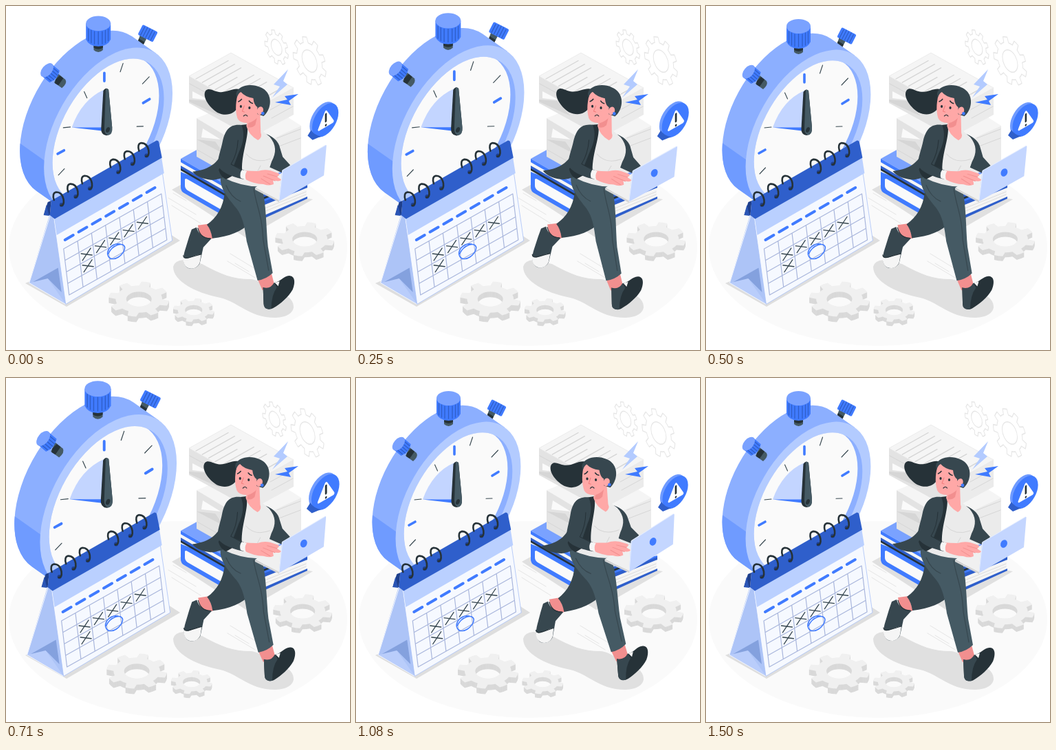
Animation of 500x500 px, one loop 1540 ms. Source, as an HTML page:

```html
<!DOCTYPE html>
<html lang="en">
<head>
<meta charset="utf-8">
<title>Deadline</title>
<style>
html, body { margin: 0; width: 100%; height: 100%; overflow: hidden; background: #fff; }
svg { display: block; width: 100vw; height: 100vh; }
.line { fill: none; stroke-linecap: round; stroke-linejoin: round; }
</style>
</head>
<body>
<svg viewBox="0 0 500 500">
  <ellipse cx="250" cy="351" rx="246" ry="143" fill="#fafafa"/>
  <path class="line" stroke="#e6e6e6" d="M236 279L276 303M243 272L262 283M241 290L283 316M326 360L372 388M333 374L353 386M322 371L362 395"/>

  <g id="clock">
    <!-- side buttons -->
    <path d="M195 42L205 47L198 60L190 56Z" fill="#455a64"/>
    <path d="M190 56L198 60L200 56L192 51Z" fill="#263238"/>
    <g transform="translate(204.500 43.500) rotate(27)">
      <rect x="-12" y="-8" width="24" height="16" rx="2" fill="#407bff"/>
      <path class="line" stroke="#2f5fc8" stroke-width="1.300" d="M-8 -6V7M-4 -7V7M0 -7V7M4 -7V7M8 -6V7"/>
    </g>
    <g transform="matrix(.866 -.5 0 1 148.500 181)">
      <path fill="#8cafff" d="M78 -70.300L38.700 -113.900A105 105 0 0 0 -117.300 26.700L-78 70.300Z"/>
      <path fill="#6f9bff" d="M-104.500 -10L-143.800 -53.600A105 105 0 0 0 -117.300 26.700L-78 70.300Z"/>
      <circle r="105" fill="#b3cbff"/>
      <circle r="91" fill="#8cafff"/>
      <clipPath id="hole"><circle r="91"/></clipPath>
      <g clip-path="url(#hole)"><circle cx="-8" cy="-8" r="91" fill="#fafafa"/></g>
    </g>
    <path class="line" stroke="#407bff" stroke-width="3.600" d="M143 99.500V111M198 142L207 136.500M77 214L86 209"/>
    <path class="line" stroke="#37474f" stroke-width="1.100" d="M169.500 86L165.500 98M206.500 105L197 115M198 175L189 175.300M114.500 126L118.500 135M85 177L95 176M86.500 235L78 244"/>
    <path d="M97 176.500Q111 137 143 123L146 180Z" fill="#c3d5ff"/>
    <path d="M97 176.500L140 176.500V181.500Z" fill="#407bff"/>
    <path d="M141.500 125Q145 119 149 123L154 176Q155 187 146 188Q138 187 138.500 178Z" fill="#263238"/>
    <path d="M145 122Q148 121 149 124L154 176Q155 187 148 187.500Q143 186 143 178Z" fill="#455a64"/>
    <ellipse cx="148" cy="180" rx="2.600" ry="4" transform="rotate(25 148 180)" fill="#263238"/>

    <!-- crown -->
    <path d="M128 56H141V67Q134.500 73 128 67Z" fill="#455a64"/>
    <path d="M128 60H141V64Q134.500 68 128 64Z" fill="#263238"/>
    <path d="M117 29.500V52Q121 61.500 134.500 62Q148 61.500 152 52V29.500Z" fill="#407bff"/>
    <path class="line" stroke="#2f5fc8" stroke-width="1.300" d="M120.500 37V54M124.500 39V57M129 41V58.500M134.500 41V59M140 41V58.500M144.500 39V57M148.500 37V54"/>
    <ellipse cx="134.500" cy="29.500" rx="17.500" ry="10.500" fill="#7aa2ff"/>

    <!-- left button -->
    <path d="M78 101L88 109Q91 114 83 121L72 113Z" fill="#455a64"/>
    <path d="M74 109L80 103L85 107L78 117L73 114Z" fill="#263238"/>
    <g transform="translate(66.500 99.500) rotate(-50)">
      <path d="M-11 -7V8Q0 14 11 8V-7Z" fill="#407bff"/>
      <path class="line" stroke="#2f5fc8" stroke-width="1.300" d="M-8 -2V8M-4 0V10M0 0V10M4 0V10M8 -2V8"/>
      <ellipse cy="-6" rx="11.500" ry="7" fill="#7aa2ff"/>
    </g>
  </g>

  <path d="M28 403L40 398L90 415L236 330L253 341L88 437Z" fill="#dedede"/>

  <g class="shake">
    <!-- calendar stand -->
    <path d="M64 302L34 402.500L87 433.500L70 300Z" fill="#adc4f7"/>
    <path d="M38 402L76 380.500L81 416L62 397Z" fill="#84a1de"/>
    <path d="M34 402.500L61 396L87 433Z" fill="#b9cdfb"/>
    <path class="line" stroke="#f2f6ff" d="M64 306L34 402.500L87 433.500"/>
    <path d="M66 286L221 197L242 341L87 433.500Z" fill="#f6f9ff" stroke="#a9c1f6" stroke-width=".8"/>
    <path d="M70 306L226 218L230 243L74 333Z" fill="#bad0ff"/>
    <path d="M66 283L219 195.500Q222 195 222.500 198L227 220.500L71 309.500L64 304Z" fill="#2f5fcb"/>
    <path d="M61 285L66 283L64 304L55 304Z" fill="#1e3f8c"/>
    <path d="M55 304L59 289L63 305Z" fill="#2a55b5"/>
    <g id="sheet"></g>
    <path class="line" stroke="#407bff" stroke-width="1.500" d="M166 346C153 344 145 357 149 364C156 374 173 361 173 351C171 342 155 347 149 360"/>
  </g>

  <g class="shake" id="gears"></g>

  <!-- books and paper -->
  <path d="M241 267L272 250L446 281L349 337Z" fill="#e0e0e0"/>
  <path d="M254 241L346 278L438 258V264L346 304Z" fill="#407bff"/>
  <path d="M254 241L346 294V322L259 272Q254 269 254 264Z" fill="#407bff"/>
  <path d="M260 252Q261 250 264 252L346 299V315L264 268Q260 265 260 261Z" fill="#fafafa"/>
  <path d="M346 299L437 264V278L346 317Z" fill="#f5f5f5"/>
  <path d="M346 295L438 260V264L346 301ZM346 317L438 277V280L346 322Z" fill="#2f5fcb"/>
  <path d="M346 306L436 270M346 311L436 274" class="line" stroke="#dcdcdc"/>
  <path d="M254 234L346 287L438 252V256L346 292L254 239Z" fill="#263238"/>
  <path d="M254 222L281 207L438 241L346 275Z" fill="#7aa2ff"/>
  <path d="M256 227L346 279L437 245V250L346 285L256 233Z" fill="#f5f5f5"/>
  <path d="M254 222L346 275L438 241V245L346 280L254 227Z" fill="#407bff"/>
  <path d="M254 232L346 285L438 250V253L346 289L254 236Z" fill="#2f5fcb"/>
  <path d="M277 163L353 207V262L277 219Z" fill="#e3e3e3"/>
  <path d="M353 207L429 174V226L353 264Z" fill="#ebebeb"/>
  <path d="M277 163L360 130L429 174L353 209Z" fill="#f5f5f5"/>
  <path d="M286 178L312 194L284 191Z" fill="#fafafa"/>
  <path d="M277 194L304 197L317 215L277 194Z" fill="#d6d6d6"/>
  <path class="line" stroke="#d6d6d6" d="M278 209L320 233M394 192L428 179M394 205L428 192"/>
  <path d="M266 102L357 153V191L266 141Z" fill="#e3e3e3"/>
  <path d="M357 153L418 119V158L357 191Z" fill="#ebebeb"/>
  <path d="M266 102L327 68L418 119L357 153Z" fill="#f5f5f5" stroke="#e3e3e3" stroke-width=".6"/>
  <path d="M271 124L296 137L271 134Z" fill="#fafafa"/>
  <path d="M266 136L292 138L312 160L266 139Z" fill="#d6d6d6"/>
  <path class="line" stroke="#d6d6d6" d="M267 113L300 131M384 151L417 133M386 163L417 146"/>
  <g id="print" class="line" stroke="#d6d6d6" stroke-width="1.400"></g>

  <path d="M410 92L389 114L398 117L387 133L409 114L403 109Z" fill="#b3cbff"/>
  <path d="M425 128L405 131L409 136L391 140L414 144L411 138Z" fill="#407bff"/>

  <path d="M243 379Q245 370 258 369L285 375C312 390 330 397 355 397C372 398 380 411 400 418Q418 424 418 438C416 453 390 457 365 449C337 438 331 428 307 423C278 417 243 401 243 379Z" fill="#e0e0e0"/>

  <g id="woman">
    <!-- trailing leg -->
    <path d="M279 319L294 317L301 338L284 343Z" fill="#f28f8f"/>
    <path d="M277 322Q281 337 299 338L287 351L282 374C278 383 266 384 262 379C256 372 258 362 262 350Q266 336 270 325Z" fill="#37474f"/>
    <path d="M258 365C264 371 272 362 284 361L282 373C278 384 266 384 261 378Q257 373 258 365Z" fill="#f5f5f5"/>
    <path class="line" stroke="#263238" stroke-width="1.200" d="M258 363C259 371 270 364 284 361M279 323Q283 338 297 338"/>
    <path d="M318 270C316 293 306 308 292 318Q298 325 300 338C325 335 343 328 356 314L350 272Z" fill="#37474f"/>

    <!-- leading leg -->
    <path d="M366 397L386 388L391 407L373 413Z" fill="#f28f8f"/>
    <path d="M374 409Q384 415 391 402C399 401 405 391 413 392C422 393 420 405 417 412C411 423 399 433 389 439C381 443 375 439 375 432Z" fill="#263238"/>
    <path d="M374 409Q385 412 390 402L394 409Q386 420 386 440Q375 442 375 433Z" fill="#37474f"/>
    <path d="M391 402L398 400L396 407Z" fill="#f5f5f5"/>
    <path d="M312 248C310 264 321 277 335 294C344 306 347 320 350 342L366 399Q379 397 388 388L381 350C378 322 379 288 371 259Z" fill="#455a64"/>
    <path class="line" stroke="#37474f" stroke-width="1.200" d="M360 265C364 292 372 301 374 340L382 384M320 261Q327 278 341 284"/>

    <!-- torso -->
    <path d="M378 186Q395 193 398 206L402 219L413 231L403 243L378 232Z" fill="#37474f"/>
    <path d="M331 176L349 172L372 181L383 190C393 202 393 213 386 226L374 262Q345 264 315 249Z" fill="#ebebeb"/>
    <path class="line" stroke="#d6d6d6" d="M349 215Q362 230 384 222M370 232L364 243"/>
    <path d="M315 212C305 232 292 238 271 241C277 249 290 253 302 253Q318 250 331 243Z" fill="#37474f"/>
    <path d="M341 173L350 172C354 189 342 213 343 239L320 252Q312 249 309 238Z" fill="#263238"/>
    <path d="M342 173C325 171 319 180 315 195C312 211 307 221 308 231C310 241 330 249 347 252L351 241L331 232L339 211Q349 190 342 173Z" fill="#37474f"/>
    <path class="line" stroke="#263238" d="M337 195Q336 215 327 230L346 240"/>

    <!-- laptop and hands -->
    <path d="M362 264L376 255L402 242L397 283Z" fill="#f0f0f0"/>
    <path d="M362 264L397 282V285L362 267Z" fill="#d6d6d6"/>
    <path d="M401 239L464 202Q466 201 465.500 204L462 246L398 283Q396 283 397 280Z" fill="#c4d6ff"/>
    <path class="line" stroke="#e6eeff" d="M464 202L402 238.500L397 282"/>
    <ellipse cx="433" cy="241" rx="4.700" ry="6" transform="rotate(25 433 241)" fill="#407bff"/>
    <path d="M345 239Q356 240 366 240Q375 237 384 239L396 243Q399 245 394 248L400 252Q398 256 388 253L389 259Q383 262 374 259Q361 259 346 251Z" fill="#ffa8a7"/>
    <path class="line" stroke="#f28f8f" d="M374 247L391 254M371 251L384 259M380 244L394 248"/>
    <path d="M343 238L350 240Q346 246 349 253L341 250Q339 243 343 238Z" fill="#f5f5f5"/>

    <!-- head -->
    <path d="M344 123C331 116 323 127 309 125C301 124 295 118 290 123C284 131 294 147 307 155C320 161 331 157 337 147Z" fill="#263238"/>
    <path d="M352 163L349 174Q352 187 366 195Q373 191 370 184L369 155Z" fill="#ffa8a7"/>
    <path d="M352 170Q360 168 365 160L362 173Q357 178 351 176Z" fill="#f28f8f"/>
    <path d="M337 125C334 138 332 150 336 163Q339 170 350 170Q364 168 370 154L371 133L350 120Z" fill="#ffa8a7"/>
    <path d="M334 127C337 115 356 112 369 118C382 123 386 136 382 148Q379 156 374 160L365 157L365 147Q360 144 359 134Q347 132 341 125Q337 127 335 134Z" fill="#37474f"/>
    <ellipse cx="369" cy="152" rx="4.500" ry="6" transform="rotate(20 369 152)" fill="#ffa8a7"/>
    <circle cx="373" cy="156" r="2.400" fill="#407bff"/>
    <ellipse cx="341" cy="146" rx="1.600" ry="2" fill="#263238"/>
    <ellipse cx="353.500" cy="148" rx="1.600" ry="2" fill="#263238"/>
    <path class="line" stroke="#263238" stroke-width="1.600" d="M337.500 139Q340 138 342 135.500M353 138Q355 141 358 141.500"/>
    <path class="line" stroke="#f27f7f" stroke-width="1.100" d="M346 145L343 153L346 154"/>
    <path class="line" stroke="#263238" stroke-width="1.200" d="M345 160Q348 156.500 350.500 160"/>
  </g>

  <g id="bubble">
    <g transform="matrix(.866 -.5 0 1 464 166)">
      <circle cx="-4" cy="-4" r="21.500" fill="#6f9bff"/>
      <circle r="21.500" fill="#407bff"/>
    </g>
    <path d="M444 180L439 188L446 194L458 189Q448 187 444 180Z" fill="#2f5fcb"/>
    <g transform="matrix(.866 -.5 0 1 464 166)">
      <path d="M1 -11L12 8H-10Z" fill="#fff" stroke="#fff" stroke-width="4" stroke-linejoin="round"/>
      <path class="line" stroke="#263238" stroke-width="3" d="M1 -8V2M1 7.500V7.600"/>
    </g>
  </g>
</svg>
<script>
const $ = id => document.getElementById(id);
const range = n => [...Array(n).keys()];

// Toothed wheel with a round hole, centred on 0,0.
function gear(teeth, r, hole) {
  const step = 2 * Math.PI / teeth, root = r * .77;
  const at = (rad, a) => `${(rad * Math.cos(a)).toFixed(2)} ${(rad * Math.sin(a)).toFixed(2)}`;
  const rim = range(teeth).map(i => {
    const a = (i + .3) * step;
    return `${at(root, a - step * .29)}L${at(r, a - step * .19)}A${r} ${r} 0 0 1 ${at(r, a + step * .19)}` +
      `L${at(root, a + step * .29)}A${root} ${root} 0 0 1 ${at(root, a + step * .71)}`;
  });
  return `M${rim.join('L')}ZM${hole} 0A${hole} ${hole} 0 1 0 ${-hole} 0A${hole} ${hole} 0 1 0 ${hole} 0Z`;
}

function flatGear(x, y, r, depth) {
  const d = gear(8, r, r * .42);
  return range(depth + 1).reverse().map(k =>
    `<path d="${d}" fill-rule="evenodd" fill="${k ? '#d9d9d9' : '#f0f0f0'}" transform="matrix(1 0 0 .58 ${x} ${y + k})"/>`).join('');
}

const outlineGear = (x, y, r) =>
  `<path d="${gear(9, r, r * .46)}" class="line" stroke="#e6e6e6" stroke-width="1.300" transform="matrix(.8 .42 0 1.100 ${x} ${y})"/>`;

$('gears').innerHTML = outlineGear(393.5, 60, 21.5) + outlineGear(441.5, 80, 30) +
  flatGear(193.5, 426, 44, 8) + flatGear(273, 442, 30, 6) + flatGear(434.5, 339, 43, 7);

// Calendar sheet: a skewed 7 x 4 grid.
const cell = (c, r) => [84 + c * 20.3 + r * 2, 353 - c * 11.43 + r * 16.75];
const seg = (a, b) => `M${a}L${b}`;
const grid = range(8).map(c => seg(cell(c, 0), cell(c, 4))).concat(range(5).map(r => seg(cell(0, r), cell(7, r))));
const crosses = [[1, 1], [2, 1], [3, 1], [4, 1], [5, 1], [1, 2]].map(([c, r]) => {
  const [x, y] = cell(c + .5, r + .5);
  return `M${x - 8} ${y - 1}L${x + 8} ${y + 1}M${x + 6} ${y - 9}L${x - 6} ${y + 9}`;
});
const dashes = range(7).map(i => `M${86 + i * 19.8} ${340 - i * 11.5}l12 -7`);
const stroke = (d, color, width) => `<path class="line" d="${d.join('')}" stroke="${color}" stroke-width="${width}"/>`;
const rings = [0, 1, 2, 4, 5, 6].map(i => {
  const x = 82 + i * 20.6, y = 290 - i * 11.9;
  return `<circle cx="${x - 1}" cy="${y - 1}" r="3" fill="#1e3f8c"/>` +
    stroke([`M${x - 12} ${y - 8}q-3 -10 3 -11.500q9 0 11 11q1 9 -4 8.500`], '#263238', 2.6);
});
$('sheet').innerHTML = stroke(grid, '#a9b6dc', 1.2) + stroke(crosses, '#37474f', 1.3) +
  stroke(dashes, '#407bff', 4) + rings.join('');

$('print').innerHTML = `<path d="${range(9).map(i =>
  `M${276 + i * 9.3} ${106 + i * 5.2}l${i % 4 == 3 ? 32 : 47} ${i % 4 == 3 ? -18 : -26.5}`).join('')}"/>`;

// Motion tracks: [progress, value], linear between keys.
const beat = [[0, 1], [.1, 1.1], [.3, 1], [.4, 1], [.5, 1.1], [.6, 1], [1, 1]];
const shake = [[0, 0], [.1, -1], [.2, 2], [.3, -4], [.4, 4], [.5, -4], [.6, 4], [.7, -4], [.8, 2], [.9, -1], [1, 0]];
const sway = [[0, 0], [.25, 1.5], [.75, -2.3], [1, 0]];

function value(track, p) {
  const i = Math.max(1, track.findIndex(k => k[0] >= p));
  const [p0, v0] = track[i - 1], [p1, v1] = track[i];
  return v0 + (v1 - v0) * (p - p0) / (p1 - p0);
}

const LOOP = 1540, STEPS = 37, STEP = LOOP / STEPS;
const scaleAt = (s, x, y) => `translate(${x} ${y}) scale(${s}) translate(${-x} ${-y})`;
const shaken = document.querySelectorAll('.shake');

function draw(ms) {
  const step = Math.min(STEPS - 1, Math.floor((ms % LOOP + 5) / STEP));
  const p = Math.min(1, (step * STEP + 42) / 1523);
  const s = value(beat, p);
  $('clock').setAttribute('transform', scaleAt(s, 146, 180));
  $('bubble').setAttribute('transform', scaleAt(s, 462, 167));
  $('woman').setAttribute('transform', `rotate(${value(sway, p)} 350 275)`);
  shaken.forEach(g => g.setAttribute('transform', `translate(${value(shake, p)} 0)`));
}

const start = performance.now();
function tick() {
  draw(performance.now() - start);
  requestAnimationFrame(tick);
}
tick();
</script>
</body>
</html>
```
